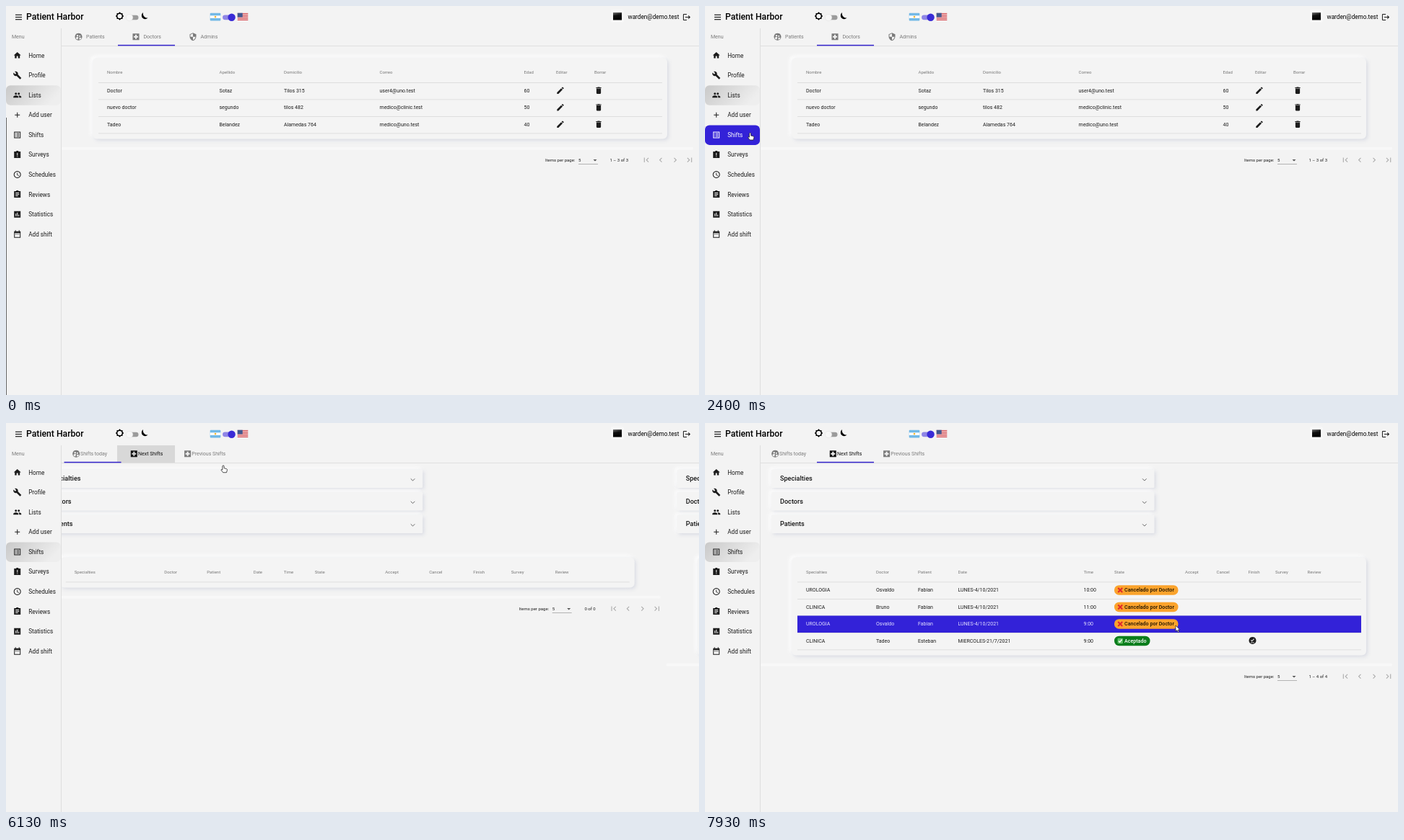
Write an HTML page that moves like this. It is 960 by 540 pixels and loops after 8 s.

```html
<!DOCTYPE html>
<html lang="en">
<head>
<meta charset="utf-8">
<title>Patient Harbor</title>
<style>
html, body { margin: 0; width: 100%; height: 100%; overflow: hidden; background: #f3f3f3; }
svg { display: block; width: 960px; height: 540px; font-family: Roboto, Inter, sans-serif; fill: #1c1c1c; }
.raised { filter: drop-shadow(2.5px 2.5px 2.5px #d8dae2) drop-shadow(-2.5px -2.5px 2.5px #fcfcfc); }
</style>
</head>
<body>
<svg id="stage" viewBox="0 0 960 540"></svg>
<script>
const LOOP = 8000, BLUE = '#3322d8', INK = '#1c1c1c', GREY = '#7b7b7b';
const ROUTE = 3270, SPIN = 3300, LOADED = 3800, SLIDE = 6070, CONTENT_W = 883;

const BOARD = 'M3 3h6V1h6v2h6v18H3z';
const BOX = 'M3 3h18v18H3z';
const ICONS = {
  home: 'M10 20v-6h4v6h5v-8h3L12 3 2 12h3v8z',
  build: 'M22.7 19l-9.1-9.1c.9-2.3.4-5-1.5-6.9-2-2-5-2.4-7.4-1.3L9 6 6 9 1.6 4.7C.4 7.1.9 10.1 2.9 12.1c1.9 1.9 4.6 2.4 6.9 1.5l9.1 9.1c.4.4 1 .4 1.4 0l2.3-2.3c.5-.4.5-1.1.1-1.4z',
  group: 'M8 5a3 3 0 1 0 .01 0zM16 5a3 3 0 1 0 .01 0zM8 13c-2.3 0-7 1.2-7 3.5V19h14v-2.5C15 14.2 10.3 13 8 13zM16 13l-1 .1c1.2.8 2 1.9 2 3.4V19h6v-2.5C23 14.2 18.3 13 16 13z',
  add: 'M19 13h-6v6h-2v-6H5v-2h6V5h2v6h6z',
  list: BOX + 'M5 5v14h14V5zM7 7h2v2H7zM11 7h6v2h-6zM7 11h2v2H7zM11 11h6v2h-6zM7 15h2v2H7zM11 15h6v2h-6z',
  survey: BOARD + 'M11 7h2v7h-2zM11 16h2v2h-2z',
  clock: 'M12 2a10 10 0 1 0 .01 0zM12 4a8 8 0 1 1-.01 0zM11 7h1.5v5.2l4.5 2.7-.8 1.2L11 13z',
  review: BOARD + 'M7 7h10v2H7zM7 11h10v2H7zM7 15h7v2H7z',
  stats: BOX + 'M7 10h2v7H7zM11 7h2v10h-2zM15 13h2v4h-2z',
  event: 'M3 4h3V1h2v3h8V1h2v3h3v18H3zM5 9v11h14V9zM7 11h2v2H7zM11 11h2v2h-2zM15 11h2v2h-2z',
  users: 'M12 2a10 10 0 1 0 .01 0zM9 6.5a2.5 2.5 0 1 0 .01 0zM15.5 8a2 2 0 1 0 .01 0zM4.5 16c1-3 4-3.5 7-3L10 19.5C7.5 19 5.5 18 4.5 16zM14 14c3-.5 5 .5 6 1-1 3-3 4.5-6 5z',
  hospital: BOX + 'M10 6h4v4h4v4h-4v4h-4v-4H6v-4h4z',
  shield: 'M12 1L3 5v6c0 5.5 3.8 10.7 9 12 5.2-1.3 9-6.5 9-12V5zM12 12h7c-.5 4.1-3.3 7.8-7 9V12H5V6.3l7-3.1z',
  logout: 'M17 7l-1.4 1.4L18.2 11H8v2h10.2l-2.6 2.6L17 17l5-5zM4 5h8V3H4a2 2 0 0 0-2 2v14a2 2 0 0 0 2 2h8v-2H4z',
  edit: 'M3 17.25V21h3.75L17.8 9.9l-3.7-3.7zM20.7 7a1 1 0 0 0 0-1.4l-2.3-2.3a1 1 0 0 0-1.4 0l-1.9 1.8 3.8 3.8z',
  trash: 'M6 19a2 2 0 0 0 2 2h8a2 2 0 0 0 2-2V7H6zM19 4h-3.5l-1-1h-5l-1 1H5v2h14z',
  first: 'M18.4 16.6L13.8 12l4.6-4.6L17 6l-6 6 6 6zM6 6h2v12H6z',
  prev: 'M15.4 7.4L14 6l-6 6 6 6 1.4-1.4L10.8 12z',
  done: 'M12 2a10 10 0 1 0 .01 0zM7 17h10v1.5H7zM10.3 15L6.8 11.5l1.4-1.4 2.1 2.1 5.3-5.3L17 8.3z'
};

const text = (x, y, s, size = 7, fill = 'inherit', extra = '') =>
  `<text x="${x}" y="${y + size * 0.355}" font-size="${size}" fill="${fill}" ${extra}>${s}</text>`;
const rect = (x, y, w, h, fill, extra = '') =>
  `<rect x="${x}" y="${y}" width="${w}" height="${h}" fill="${fill}" ${extra}/>`;
const circle = (x, y, r, fill, extra = '') =>
  `<circle cx="${x}" cy="${y}" r="${r}" fill="${fill}" ${extra}/>`;
const icon = (name, x, y, size = 12, fill = 'inherit', flip = 1) =>
  `<path d="${ICONS[name]}" fill="${fill}" fill-rule="evenodd" transform="translate(${x} ${y}) scale(${flip * size / 24} ${size / 24}) translate(-12 -12)"/>`;
const group = (id, body, extra = '') => `<g id="${id}" ${extra}>${body}</g>`;

const MENU = [['home', 'Home'], ['build', 'Profile'], ['group', 'Lists'], ['add', 'Add user'], ['list', 'Shifts'],
  ['survey', 'Surveys'], ['clock', 'Schedules'], ['review', 'Reviews'], ['stats', 'Statistics'], ['event', 'Add shift']];
const menuY = i => 68.6 + i * 27.57;

function sidebar() {
  const items = MENU.map(([name, label], i) =>
    group('menu' + i, icon(name, 15.7, menuY(i)) + text(31.2, menuY(i), label, 8.2))).join('');
  return text(8, 42.5, 'Menu', 7, '#777')
    + rect(76, 31, 1, 509, '#dedede')
    + rect(0, 110, 76, 27.5, 'url(#press)', 'id="selected" rx="6"')
    + rect(0, menuY(4) - 13.5, 76, 27.5, BLUE, 'id="menuHover" rx="6"')
    + rect(0, 155, 1, 385, '#666', 'id="edge"') + items;
}

function header() {
  const bars = [11.7, 14.9, 18.1].map(y => rect(13, y, 9, 1.2, INK)).join('');
  const gear = [0, 45].map(a => rect(153.5, 10, 8, 8, '#000', `transform="rotate(${a} 157.5 14)"`)).join('')
    + circle(157.5, 14, 3.1, '#f3f3f3');
  const argentina = rect(282.7, 9.7, 14.6, 10.8, '#73b9e6', 'rx="1"') + rect(282.7, 13.3, 14.6, 3.6, '#fff')
    + circle(290, 15.1, 1.3, '#f2b632');
  let usa = rect(320.7, 9.7, 14.6, 10.8, '#fff', 'rx="1"');
  for (let i = 0; i < 5; i++) usa += rect(320.7, 9.9 + i * 2.2, 14.6, 1.3, '#d24a50');
  usa += rect(320.7, 9.7, 7, 5.8, '#41588f');
  return bars + text(28, 14.8, 'Patient Harbor', 12.2, '#000', 'font-weight="500"') + gear
    + rect(170, 12.7, 13.5, 6.5, '#9b9b9b', 'rx="3.2"') + circle(171, 16, 4.7, '#f7f7f7', 'stroke="#e2e2e2" stroke-width=".6"')
    + '<path d="M190 9a5 5 0 1 0 6.5 7.5A6 6 0 0 1 190 9z" fill="#000"/>'
    + argentina + rect(300, 12.4, 15, 6.8, '#8f86e6', 'rx="3.4"') + circle(312.6, 15.8, 5.2, '#3a2bd6') + usa
    + rect(838, 5, 18, 18, '#f8f8f8', 'rx="3"') + rect(841, 9, 12, 10.5, 'url(#avatar)')
    + text(861.5, 15.3, 'warden@demo.test', 8.2, '#000') + icon('logout', 943, 15.5, 12.2);
}

const tab = (name, ix, label, tx, id = '') =>
  `<g ${id} fill="${GREY}">` + icon(name, ix, 42.7) + text(tx, 42.7, label) + '</g>';

function paginator(y, range, shift = 0) {
  const pale = '#aaa';
  return rect(77, y - 18, 875, 4, '#f8f8f8', 'rx="2"')
    + text(747 + shift, y, 'Items per page:', 6) + text(793 + shift, y, '5', 6)
    + rect(793 + shift, y + 5.5, 27, .7, '#999')
    + `<path d="M${813.5 + shift} ${y - .7}h5l-2.5 2.5z" fill="#555"/>`
    + text(862, y, range, 6, INK, 'text-anchor="end"')
    + icon('first', 887, y, 13, pale) + icon('prev', 907, y, 13, pale)
    + icon('prev', 927, y, 13, pale, -1) + icon('first', 947, y, 13, pale, -1);
}

const PITCH = 23.5;
// a cell is text or a drawing function (x, y) => markup
function table(y, cols, heads, rows, prefix, hoverFill) {
  const top = y + 14;
  const line = i => rect(128, top + i * PITCH, 781, .8, '#d9d9d9');
  let out = rect(120, y - 20, 796, 42 + rows.length * PITCH, '#f4f4f4', 'rx="6" class="raised"');
  out += heads.map((h, i) => text(cols[i], y, h, 6, '#777')).join('') + line(0);
  rows.forEach((row, r) => {
    const cy = top + r * PITCH + 11.2;
    const cells = row.map((c, i) => typeof c === 'function' ? c(cols[i], cy) : text(cols[i], cy, c));
    out += line(r + 1) + rect(128, top + r * PITCH, 781, PITCH, hoverFill, `id="${prefix}${r}" opacity="0"`)
      + group(prefix + 'Text' + r, cells.join(''));
  });
  return out;
}

const PANELS = ['Specialties', 'Doctors', 'Patients'];
const panels = prefix => PANELS.map((label, i) => {
  const y = 64.5 + i * 31.5;
  return rect(92, y, 530.5, 25.5, '#f4f4f4', 'rx="1.5" class="raised"')
    + rect(92, y, 530.5, 25.5, '#e7eae9', `id="${prefix}${i}" opacity="0"`)
    + text(104, y + 12.6, label, 9.1, '#161616', 'font-weight="500"')
    + `<path d="M606 ${y + 12.8}l2.8 2.8 2.8-2.8" fill="none" stroke="#666"/>`;
}).join('');

const badge = (w, fill, ink, label, mark) => (x, y) => rect(x, y - 6.5, w, 13.5, fill, 'rx="6.5"')
  + `<g transform="translate(${x + 8.2} ${y + .3})">${mark}</g>` + text(x + 14, y, label, 7.1, ink, 'font-weight="500"');
const cancelled = badge(88.5, '#fba32c', '#1c1200', 'Cancelado por Doctor',
  '<path d="M-3-3L3 3M3-3L-3 3" stroke="#e0262d" stroke-width="1.9"/>');
const accepted = badge(49.5, '#0b7d1c', '#fff', 'Aceptado',
  rect(-3.7, -3.7, 7.4, 7.4, '#5bbf63', 'rx="1"') + '<path d="M-2.2 0l1.6 1.8L2.3-2" fill="none" stroke="#fff" stroke-width="1.3"/>');
const editCell = (x, y) => icon('edit', x + 6, y, 12.5);
const trashCell = (x, y) => icon('trash', x + 6, y, 12.5);
const finishCell = (x, y) => icon('done', x + 6, y - .3);

const SHIFT_HEADS = ['Specialties', 'Doctor', 'Patient', 'Date', 'Time', 'State', 'Accept', 'Cancel', 'Finish', 'Survey', 'Review'];

const doctors = table(92, [140, 295.5, 385, 517.5, 717.5, 762, 815],
  ['Nombre', 'Apellido', 'Domicilio', 'Correo', 'Edad', 'Editar', 'Borrar'], [
    ['Doctor', 'Sotaz', 'Tilos 315', 'user4@uno.test', '60', editCell, trashCell],
    ['nuevo doctor', 'segundo', 'tilos 482', 'medico@clinic.test', '50', editCell, trashCell],
    ['Tadeo', 'Belandez', 'Alamedas 764', 'medico@uno.test', '40', editCell, trashCell]
  ], 'doc', '#2d82c2') + paginator(213.7, '1 – 3 of 3');

const noShifts = table(206.5, [140, 264.5, 323.5, 388, 430, 473, 570.5, 631.5, 692.5, 745, 806],
  SHIFT_HEADS, [], 'none', BLUE) + paginator(257.7, '0 of 0', 9);

const nextShifts = table(206.5, [140, 237, 295, 350.5, 524.5, 567, 665, 708.5, 752.5, 790, 834.5],
  SHIFT_HEADS, [
    ['UROLOGIA', 'Osvaldo', 'Fabian', 'LUNES-4/10/2021', '10:00', cancelled],
    ['CLINICA', 'Bruno', 'Fabian', 'LUNES-4/10/2021', '11:00', cancelled],
    ['UROLOGIA', 'Osvaldo', 'Fabian', 'LUNES-4/10/2021', '9:00', cancelled],
    ['CLINICA', 'Tadeo', 'Esteban', 'MIERCOLES-21/7/2021', '9:00', accepted, '', '', finishCell]
  ], 'shift', BLUE) + paginator(351.8, '1 – 4 of 4');

document.getElementById('stage').innerHTML = `<defs>
  <linearGradient id="press" x2="1" y2=".35"><stop stop-color="#c9c9c9"/><stop offset="1" stop-color="#eee"/></linearGradient>
  <linearGradient id="avatar" x2=".25" y2="1"><stop stop-color="#777"/><stop offset=".45" stop-color="#111"/><stop offset="1"/></linearGradient>
  <clipPath id="content"><rect x="77" y="56" width="883" height="484"/></clipPath></defs>`
  + rect(0, 0, 960, 540, '#f3f3f3') + header() + sidebar()
  + rect(154, 31, 80, 24, '#d8d8d8', 'id="tabFocus"')
  + group('listTabs', tab('users', 100.5, 'Patients', 111) + tab('hospital', 180, 'Doctors', 190.5) + tab('shield', 259, 'Admins', 269.5))
  + group('shiftTabs', tab('users', 97.2, 'Shifts today', 103) + tab('hospital', 177.3, 'Next Shifts', 183, 'id="nextTab"')
    + tab('hospital', 251.6, 'Previous Shifts', 257.3))
  + rect(77, 55, 883, .8, '#dcdcdc') + rect(155, 53.8, 79, 1.5, '#3424cc', 'id="ink"')
  + '<g clip-path="url(#content)">'
  + group('lists', doctors)
  + group('today', panels('panelA')
    + group('loading', '<path id="spinner" fill="none" stroke="#3a2bd6" stroke-width="8"/>' + paginator(434.5, '0 of 0', 9))
    + group('empty', noShifts))
  + group('next', panels('panelB') + nextShifts) + '</g>'
  + group('cursor',
    '<path id="hand" d="M-1.1.9Q0-.7 1.1.9V4l3.3.8q1.2.4 1 1.8L4.5 10H-.3L-3 6.5q-.2-1.3 1.9-.3z" fill="#fff" stroke="#222" stroke-width=".8"/>'
    + '<path id="arrow" d="M0 0v8.2l1.9-1.7 1.3 2.8 1.4-.6L3.3 6h2.5z" fill="#fff" stroke="#222" stroke-width=".7"/>');

const el = id => document.getElementById(id);
const show = (id, on) => el(id).setAttribute('display', on ? 'inline' : 'none');
const set = (id, name, value) => el(id).setAttribute(name, value);
const clamp = v => Math.max(0, Math.min(1, v));

// cubic-bezier(.35, 0, .25, 1)
function ease(p) {
  let lo = 0, hi = 1, u = .5;
  for (let i = 0; i < 24; i++) {
    u = (lo + hi) / 2;
    const x = 3 * (1 - u) ** 2 * u * .35 + 3 * (1 - u) * u * u * .25 + u ** 3;
    if (x < p) lo = u; else hi = u;
  }
  return 3 * (1 - u) * u * u + u ** 3;
}

// time, x, y
const PATH = [[330, 420, 430], [560, 330, 170], [800, 150, 160], [930, 44.5, 164], [1170, 24, 247], [1530, 48, 178],
  [1870, 48, 178], [2130, 55, 181], [2330, 55, 181], [2400, 62.5, 176], [2600, 62.5, 176], [3330, 364, 141],
  [3700, 470, 220], [4330, 440, 272], [4930, 223, 81], [5330, 196, 44], [5900, 196, 44], [6470, 488, 85],
  [6600, 496, 90], [6950, 496, 90], [7400, 590, 180], [7800, 652, 281], [LOOP, 652, 281]];

function cursorAt(t) {
  const i = Math.max(1, PATH.findIndex(p => p[0] > t));
  const [t0, x0, y0] = PATH[i - 1], [t1, x1, y1] = PATH[i];
  const p = clamp((t - t0) / (t1 - t0)), s = p * p * (3 - 2 * p);
  return [x0 + (x1 - x0) * s, y0 + (y1 - y0) * s];
}

const ARROW_TIMES = [[330, 830], [3560, 4600], [7240, LOOP]];

// element, start, end of each hover
const HOVERS = [['doc2', 540, 930], ['menuHover', 1640, 2780],
  ['panelA2', 3360, 3560], ['panelA2', 4600, 4730], ['panelA1', 4730, 4910], ['panelA0', 4940, 5160],
  ['panelB0', 6500, 7060], ['panelB1', 7060, 7140], ['panelB2', 7140, 7240],
  ['shift0', 7530, 7590], ['shift1', 7590, 7670], ['shift2', 7670, LOOP]];

function render(t) {
  const onLists = t < ROUTE;
  show('edge', t < 1670);
  set('selected', 'y', menuY(onLists ? 2 : 4) - 13.5);
  show('lists', onLists);
  show('listTabs', onLists);
  show('shiftTabs', !onLists);

  const levels = {};
  for (const [id, on, off] of HOVERS)
    levels[id] = (levels[id] || 0) + clamp((t - on) / 130) - clamp((t - off) / 130);
  for (const id in levels) set(id, 'opacity', levels[id]);
  set('menu4', 'fill', levels.menuHover > .5 ? '#fff' : INK);
  for (let r = 0; r < 3; r++) set('shiftText' + r, 'fill', levels['shift' + r] > .5 ? '#e4e1ff' : INK);
  set('docText2', 'fill', levels.doc2 > .5 ? '#0a1a50' : INK);

  const slide = ease(clamp((t - SLIDE) / 500));
  show('today', !onLists && slide < .9999);
  show('next', t > SLIDE);
  set('today', 'transform', `translate(${-CONTENT_W * slide} 0)`);
  set('next', 'transform', `translate(${CONTENT_W * (1 - slide)} 0)`);
  show('loading', t < LOADED);
  show('empty', t >= LOADED);
  show('ink', onLists || t >= 3400);
  set('ink', 'x', onLists ? 155 : 76.5 + 78.5 * slide);
  set('nextTab', 'fill', t > 5800 ? '#111' : GREY);
  set('tabFocus', 'opacity', clamp((t - 5800) / 150) - clamp((t - 6480) / 120));

  if (!onLists && t < LOADED) {
    const age = Math.max(0, t - SPIN), start = age / 2000 * 2 * Math.PI;
    const sweep = 2 * Math.PI * (.05 + .75 * ease(clamp(age / 500)));
    const point = a => `${517.8 + 35 * Math.cos(a)} ${291 + 35 * Math.sin(a)}`;
    set('spinner', 'd', `M${point(start)}A35 35 0 ${sweep > Math.PI ? 1 : 0} 1 ${point(start + sweep)}`);
  }

  const arrow = ARROW_TIMES.some(([a, b]) => t >= a && t < b);
  show('cursor', t >= 330);
  show('arrow', arrow);
  show('hand', !arrow);
  set('cursor', 'transform', `translate(${cursorAt(t).join(' ')})`);
}

const began = performance.now();
function tick() {
  render((performance.now() - began) % LOOP);
  requestAnimationFrame(tick);
}
tick();
</script>
</body>
</html>
```
